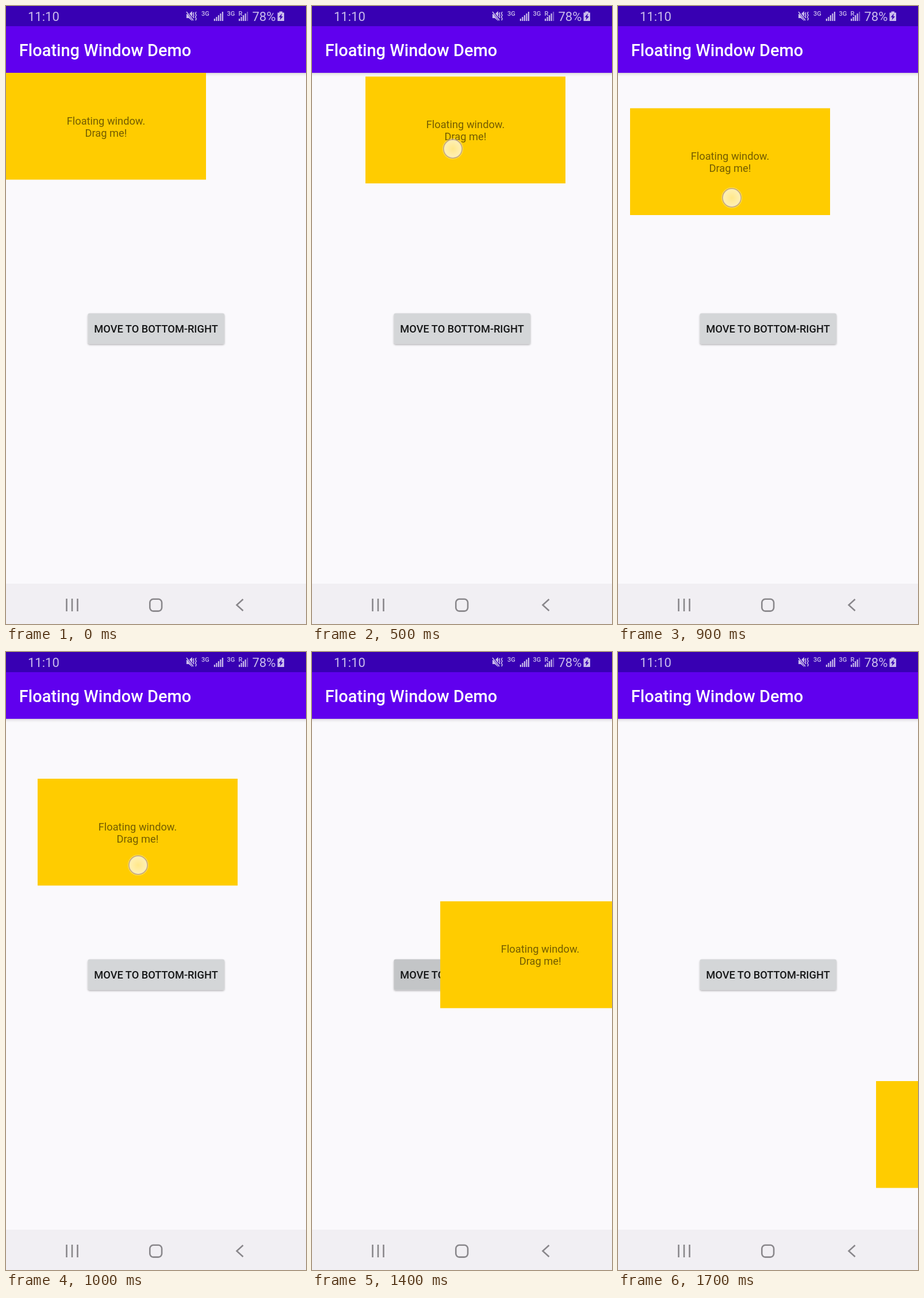
An HTML page for the animation above (2500 ms loop, 522 by 1073 pixels).

```html
<!DOCTYPE html>
<html lang="en">
<head>
<meta charset="utf-8">
<title>Floating Window Demo</title>
<style>
  html, body { margin: 0; width: 100%; height: 100%; overflow: hidden; background: #faf9fc; }
  svg { display: block; width: 100%; height: 100%; font-family: Roboto, sans-serif; }
  .medium { font-weight: 500; }
  .status { fill: #cabcec; font-size: 22px; }
  .status .small { font-size: 11px; font-weight: 500; }
  .nav { fill: none; stroke: #89878b; stroke-width: 2.6; }
</style>
</head>
<body>
<svg viewBox="0 0 522 1073">
  <defs>
    <linearGradient id="barShadow" x2="0" y2="1">
      <stop offset="0" stop-color="#000" stop-opacity=".16"/>
      <stop offset=".4" stop-color="#000" stop-opacity=".05"/>
      <stop offset="1" stop-color="#000" stop-opacity="0"/>
    </linearGradient>
    <radialGradient id="touchFill">
      <stop offset="0" stop-color="#fff" stop-opacity=".54"/>
      <stop offset="1" stop-color="#fff" stop-opacity=".72"/>
    </radialGradient>
    <filter id="buttonShadow" x="-5%" y="-20%" width="110%" height="150%">
      <feDropShadow dx="0" dy="1.8" stdDeviation="1.5" flood-opacity=".3"/>
    </filter>
    <clipPath id="buttonClip"><rect x="142.5" y="533.5" width="237.5" height="53" rx="3"/></clipPath>
  </defs>

  <rect width="522" height="1073" fill="#faf9fc"/>
  <rect y="116" width="522" height="7" fill="url(#barShadow)"/>
  <rect y="34" width="522" height="82" fill="#6000ee"/>
  <rect width="522" height="35" fill="#3800b3"/>
  <text class="medium" x="22.8" y="87" font-size="29" fill="#fff">Floating Window Demo</text>

  <g class="status">
    <text x="38" y="26">11:10</text>
    <text x="428.5" y="26">78%</text>
    <text class="small" x="340" y="17">3G</text>
    <text class="small" x="384.5" y="17">3G</text>
    <text class="small" x="404.5" y="17">R</text>
    <path d="M314 14h4l6-5v17l-6-5h-4z"/>
    <path d="M314 9l12 16" stroke="#3800b3" stroke-width="3.4"/>
    <path d="M314 10l12 15M327 11l-1.5 2.5 1.5 2.5-1.5 2.5 1.5 2.5M331 10l-1.5 3 1.5 3-1.5 3 1.5 3-1 3" fill="none" stroke="#cabcec" stroke-width="1.6"/>
    <g id="bars"></g>
    <path d="M475.500 9.500h5.500v2h3v14.500h-11.500v-14.500h3z"/>
    <path d="M480 13l-5.500 6.500h3l-1 5 5.500-6.500h-3z" fill="#3800b3"/>
  </g>

  <g filter="url(#buttonShadow)"><rect x="142.5" y="533.5" width="237.5" height="53" rx="3" fill="#d4d6d8"/></g>
  <circle id="ripple" cx="256" cy="583" clip-path="url(#buttonClip)"/>
  <text class="medium" x="261" y="567" font-size="18.27" text-anchor="middle" fill="#151617">MOVE TO BOTTOM-RIGHT</text>

  <rect y="1003" width="522" height="70" fill="#f1eff3"/>
  <g class="nav">
    <path d="M105.500 1029v22M115 1029v22M124.500 1029v22"/>
    <rect x="250.300" y="1029.800" width="20.800" height="20.800" rx="6"/>
    <path d="M412.500 1030l-11 10 11 10"/>
  </g>

  <g id="panel">
    <rect width="348" height="185.5" fill="#fc0"/>
    <g font-size="18.27" text-anchor="middle" fill-opacity=".55">
      <text x="174" y="89.500">Floating window.</text>
      <text x="174" y="110.500">Drag me!</text>
    </g>
  </g>

  <g id="touch">
    <circle r="17.5" fill="none" stroke="#fff" stroke-opacity=".3" stroke-width="1.5"/>
    <circle r="16" fill="url(#touchFill)" stroke="#826eb4" stroke-opacity=".4" stroke-width="2"/>
  </g>
</svg>
<script>
const LOOP = 2500, STEP = 100;
const $ = id => document.getElementById(id);

// Drag poses, one per step: panel x, y and, while pressed, touch x, y.
const DRAG_START = 300;
const drag = [
  [30, 122, 205, 255], [169, 140, 325, 272], [93, 122.5, 245, 248],
  [32, 165, 190, 300], [64, 218, 248, 352], [75, 190, 242, 333],
  [21, 177.500, 198, 333], [55, 220, 230, 370], [93, 253, 262, 400],
  [93, 253], [93, 253, 256, 583]
];

// Automatic move to the corner, easing in and out.
const MOVE_START = 1276, MOVE_TIME = 300;
const from = [93, 253], to = [449, 745];

function poseAt(ms) {
  if (ms < DRAG_START) return [0, 116];
  const step = (ms - DRAG_START) / STEP;
  if (step < drag.length) return drag[step];
  const t = Math.min(1, (ms - MOVE_START) / MOVE_TIME);
  const eased = (1 - Math.cos(Math.PI * t)) / 2;
  return from.map((start, i) => start + (to[i] - start) * eased);
}

// Press feedback on the button: time -> [radius, opacity].
const ripples = { 1300: [76, .045], 1400: [160, .08], 1500: [260, .12], 1600: [260, .045] };

function place(element, x, y) {
  element.setAttribute("transform", `translate(${x} ${y})`);
}

function drawBars(x, dimFrom) {
  for (let i = 0; i < 5; i++) {
    const height = 4 + 3 * i;
    $("bars").insertAdjacentHTML("beforeend",
      `<rect x="${x + 3.5 * i}" y="${26 - height}" width="2.2" height="${height}" opacity="${i < dimFrom ? 1 : .45}"/>`);
  }
}

function render(now) {
  const ms = Math.floor(now % LOOP / STEP) * STEP;
  const [x, y, touchX, touchY] = poseAt(ms);
  place($("panel"), x, y);
  const pressed = touchX !== undefined;
  $("touch").style.display = pressed ? "" : "none";
  if (pressed) place($("touch"), touchX, touchY);
  const [radius, opacity] = ripples[ms] || [0, 0];
  $("ripple").setAttribute("r", radius);
  $("ripple").setAttribute("fill-opacity", opacity);
}

drawBars(361.8, 5);
drawBars(405, 4);
const start = performance.now();
function tick() {
  render(performance.now() - start);
  requestAnimationFrame(tick);
}
tick();
</script>
</body>
</html>
```
